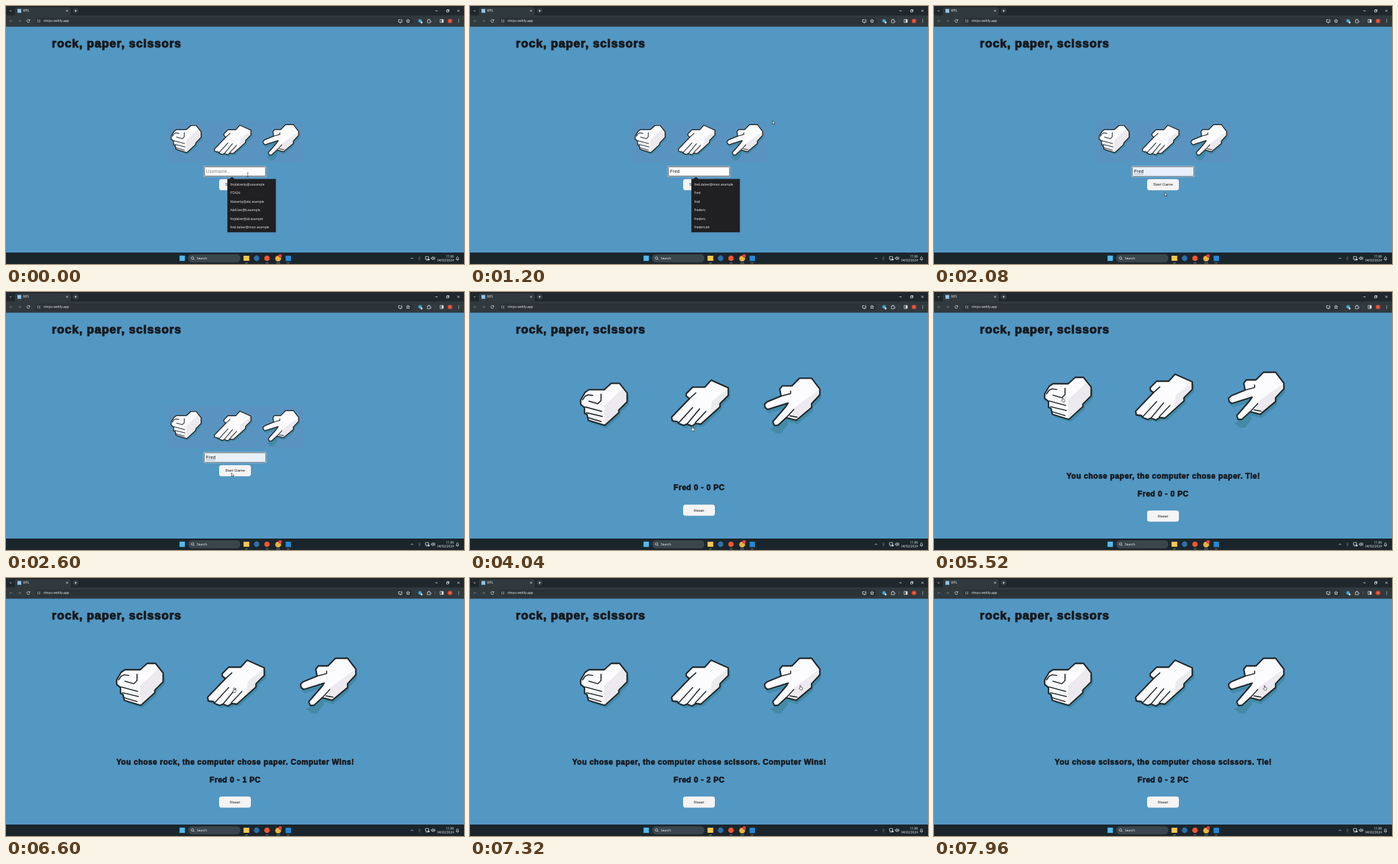
Recreate the animation shown at these times as an HTML page. Size 720x405 px, loop 8000 ms.

```html
<!DOCTYPE html>
<html lang="en">
<head>
<meta charset="utf-8">
<title>RPS</title>
<style>
  html, body { margin: 0; width: 100%; height: 100%; overflow: hidden; background: #5397c3; }
  svg { display: block; width: 720px; height: 405px; }
  text { font-family: "Open Sans", "Noto Sans", sans-serif; font-size: 5.1px; fill: #f6f8f9; }
  .arial { font-family: "Liberation Sans", Arial, sans-serif; fill: #161a1d; }
  .field { font-size: 7.2px; }
  .btn { font-size: 6.1px; text-anchor: middle; }
  .head { font-weight: 700; stroke: #161a1d; stroke-linejoin: round; }
  .title { font-size: 18.5px; letter-spacing: .95px; stroke-width: 1.1px; }
  .note { font-size: 11.9px; letter-spacing: .6px; stroke-width: .7px; text-anchor: middle; }
  .list text { font-size: 4.8px; fill: #f2f2f2; }
  .clock { font-size: 4.9px; text-anchor: end; }
  .line { fill: none; stroke: #eef1f2; stroke-width: .75; }
  .dim { stroke: #72787b; }
  .ink { stroke: #20282c; stroke-width: 2.3; stroke-linejoin: round; stroke-linecap: round; }
  .thin { fill: none; stroke-width: 1.7; }
  .shade { fill: #eceaee; }
  .shadow { fill: #438aa8; }
  .skin { fill: #fcfbfd; }
  .pointer { fill: #fff; stroke: #15181a; stroke-width: .6; stroke-linejoin: round; }
</style>
</head>
<body>
<svg viewBox="0 0 720 405">
  <defs>
    <path id="rockShape" d="M174 160L181 148 187 144H211L222 134H235L247 149V163L234 176V180L212 200 186 192 184 183 180 181V172L174 167Z"/>
    <path id="paperShape" d="M317 187L345 158 340 154V150L350 140H369L379 129 406 141V153L393 166V171L363 198 355 197 349 201 341 198 336 200 328 197 326 194 318 193Z"/>
    <path id="scissorShape" d="M463 167L467 163 489 154 487 143 491 138H506L518 126H537L550 143V152L537 166V172L513 192 497 188 484 200H478L476 194 496 171 500 165 468 175 464 172Z"/>

    <g id="rock">
      <use href="#rockShape" class="shadow" x="3" y="4"/>
      <use href="#rockShape" class="skin"/>
      <path class="shade" d="M241 141L211 169V200L234 180V176L247 163V149Z"/>
      <use href="#rockShape" class="ink" fill="none"/>
      <path class="ink thin" d="M177 160L181 154 186 152 193 153M206 151V161L201 166 187 162M181 171L207 178M183 180L208 186M186 188L206 194"/>
    </g>
    <g id="paper">
      <use href="#paperShape" class="shadow" x="3" y="4"/>
      <use href="#paperShape" class="skin"/>
      <path class="shade" d="M406 142L380 162 378 183 393 171V166L406 153Z"/>
      <use href="#paperShape" class="ink" fill="none"/>
      <path class="ink thin" d="M345 158L355 149M328 196L350 172M341 198L361 174M354 196L371 178"/>
    </g>
    <g id="scissors">
      <use href="#scissorShape" class="shadow" x="2" y="6"/>
      <path class="shadow" d="M472 206L494 191 500 198 489 213H482Z"/>
      <use href="#scissorShape" class="skin"/>
      <path class="shade" d="M550 143L511 171 498 188 513 192 537 172V166L550 152Z"/>
      <use href="#scissorShape" class="ink" fill="none"/>
      <path class="ink thin" d="M489 154L504 150V146M497 188L509 175M503 185L514 187"/>
    </g>
    <g id="hands">
      <use href="#rock"/><use href="#paper"/><use href="#scissors"/>
    </g>
    <g id="reset">
      <rect x="335" y="343" width="50" height="17.5" rx="4" fill="#f5f4f4"/>
      <text class="arial btn" x="360" y="354">Reset</text>
    </g>
  </defs>

  <rect width="720" height="405" fill="#5397c3"/>
  <text class="arial head title" x="72" y="64.8">rock, paper, scissors</text>

  <!-- browser -->
  <rect width="720" height="16" fill="#20282d"/>
  <path d="M14 15V6Q14 2 18 2H98Q102 2 102 6V15Z" fill="#30393e"/>
  <rect y="14.7" width="720" height="17.8" fill="#30393e"/>
  <rect x="46" y="18" width="594" height="11.4" rx="5.7" fill="#2b3338"/>
  <rect x="18" y="4.7" width="6" height="6" fill="#8fc4e4"/>
  <text x="27" y="9.4">RPS</text>
  <circle cx="109.5" cy="7.5" r="4.8" fill="#30393e"/>
  <path class="line" d="M5.8 6.8L7.3 8.3 8.8 6.8M94.6 6.1L97.4 8.9M97.4 6.1L94.6 8.9M109.5 5.7V9.3M107.7 7.5H111.3M675 7.6H678.6M692.6 6.6H695.4V9.4H692.6ZM693.6 6.6V5.6H696.4V8.4H695.4M709.6 5.9L712.8 9.1M712.8 5.9L709.6 9.1"/>
  <path class="line dim" d="M10.5 23.5H5.8M7.8 21.5L5.8 23.5 7.8 25.5M18.8 23.5H23.5M21.5 21.5L23.5 23.5 21.5 25.5"/>
  <path class="line" d="M37 22.4A2.2 2.2 0 1 0 37.2 24.2M37.3 21V22.6H35.6M49 22.3H51M52 22.3H54M49 24.9H50.5M51.5 24.9H54"/>
  <text x="59" y="25.4">nhrps.netlify.app</text>
  <path class="line" d="M620 21.5H617.2V25.2H622.6V23.6M618.8 26.4H621M621.8 20.6V23M620.8 22.2L621.8 23.2 622.8 22.2M632 20.8L632.8 22.6 634.7 22.7 633.2 24 633.7 26 632 24.9 630.3 26 630.8 24 629.3 22.7 631.2 22.6Z"/>
  <circle cx="650.8" cy="23.2" r="2.6" fill="#4aa3cc"/>
  <rect x="652" y="24.4" width="2.6" height="2.8" fill="#dfe6ea"/>
  <path class="line" d="M662.4 22H664V20.9H665.6V22H667V23.6H668V25H667V26.2H662.4Z"/>
  <path d="M674.5 20.5V26.5" stroke="#5b6265" stroke-width=".6"/>
  <path class="line" d="M682.4 21.2H687.4V25.8H682.4Z"/>
  <path d="M685 21.2H687.4V25.8H685Z" fill="#f6f8f9"/>
  <circle cx="698" cy="23.5" r="3.6" fill="#d9452c"/>
  <text x="698" y="25" text-anchor="middle" style="font-size:4px">F</text>
  <path d="M711.7 20.9v1M711.7 23v1M711.7 25.1v1" stroke="#f6f8f9"/>

  <!-- taskbar -->
  <rect y="387" width="720" height="18" fill="#1b252c"/>
  <rect x="272.8" y="391.8" width="8.4" height="8.4" fill="#4cbcf0"/>
  <rect x="286" y="389.7" width="82.5" height="12.8" rx="6.4" fill="#3a454c"/>
  <circle class="line" cx="293.2" cy="395.6" r="1.9"/>
  <path class="line" d="M294.6 397L296.2 398.6"/>
  <text x="300" y="398">Search</text>
  <rect x="373.4" y="392" width="9" height="8" fill="#f6c646"/>
  <circle cx="394" cy="396" r="4.4" fill="#2d6fa6"/>
  <circle cx="410.3" cy="396" r="4.3" fill="#f0552c"/>
  <circle cx="427.8" cy="396.5" r="4.6" fill="#e5b53b"/>
  <circle cx="431" cy="392.2" r="2.7" fill="#e1402f"/>
  <rect x="439.6" y="392" width="8.4" height="8.4" fill="#2489d0"/>
  <path d="M376 403.3h4M408.5 403.3h4M425 403.3h6M441.6 403.3h4" stroke="#8b979d" stroke-width=".8"/>
  <path class="line" d="M636.4 397L638.3 395.1 640.2 397M659.4 393.3H664.4V397.3H659.4ZM660.4 399H663.4M668.6 395H669.8L671.2 393.5V398.5L669.8 397H668.6ZM672.4 394.6Q673.5 396 672.4 397.4M673.6 393.6Q675.2 396 673.6 398.4M707.6 398H711.8L711 396.8V394.8Q709.7 392 708.4 394.8V396.8ZM709 399.2H710.4"/>
  <circle cx="664.6" cy="398" r="1.2" fill="#f6f8f9"/>
  <path class="line dim" d="M650 393V396.5M648.4 395.5Q650 399 651.6 395.5M650 397.5V399.5"/>
  <text class="clock" x="704" y="394.8">11:06</text>
  <text class="clock" x="704" y="400.8">04/02/2024</text>

  <!-- start page -->
  <g data-on="0 2800">
    <rect x="253" y="180" width="214" height="65" fill="#5994c0"/>
    <use href="#rock" transform="translate(147.4 101.2) scale(.645)"/>
    <use href="#paper" transform="translate(123.2 103.9) scale(.645)"/>
    <use href="#scissors" transform="translate(105.4 104.9) scale(.645)"/>
    <rect x="310.6" y="251.2" width="98.8" height="17" rx="2" fill="#f4f8fb"/>
    <rect x="311.7" y="252.3" width="96.6" height="14.8" rx="1" fill="#fff" stroke="#1c2226" stroke-width=".9"/>
    <rect data-on="1640 2800" x="312.2" y="252.8" width="95.6" height="13.8" fill="#e8f0fc"/>
    <text class="arial field" data-on="0 160" x="314.6" y="262.4" style="fill:#7b7f83">Username..</text>
    <text class="arial field" data-on="160 320" x="314.6" y="262.4">F</text>
    <text class="arial field" data-on="320 480" x="314.6" y="262.4">Fr</text>
    <text class="arial field" data-on="480 640" x="314.6" y="262.4">Fre</text>
    <text class="arial field" data-on="640 2800" x="314.6" y="262.4">Fred</text>
    <path data-on="2000 2800" d="M314.8 263.9H329.4" stroke="#6a7078" stroke-width=".5"/>
    <rect x="335" y="271.7" width="50" height="17.6" rx="4" fill="#f5f4f4"/>
    <text class="arial btn" x="360" y="282.4">Start Game</text>
    <g class="list" data-on="0 2000">
      <path d="M348 271.6H351.4L355.2 268.2 359 271.6H424.3V355.3H348Z" fill="#202023"/>
      <rect data-on="1640 2000" x="348" y="286.8" width="76.3" height="13.5" fill="#3b3b3f"/>
      <g id="before" data-on="0 320"></g>
      <g id="after" data-on="320 2000"></g>
    </g>
  </g>

  <!-- game -->
  <g data-on="2800 4800">
    <use href="#hands" y="9.4"/>
    <use href="#reset" y="-9.2"/>
    <text class="arial head note" x="360.3" y="311.4">Fred 0 - 0 PC</text>
  </g>
  <g class="head" data-on="4800 8000">
    <text class="arial note" data-on="4800 5640" x="360.5" y="292.6">You chose paper, the computer chose paper. Tie!</text>
    <text class="arial note" data-on="5640 6720" x="360.5" y="292.6">You chose rock, the computer chose paper. Computer Wins!</text>
    <text class="arial note" data-on="6720 7440" x="360.5" y="292.6">You chose paper, the computer chose scissors. Computer Wins!</text>
    <text class="arial note" data-on="7440 8000" x="360.5" y="292.6">You chose scissors, the computer chose scissors. Tie!</text>
    <text class="arial note" data-on="4800 5640" x="360.3" y="320.6">Fred 0 - 0 PC</text>
    <text class="arial note" data-on="5640 6720" x="360.3" y="320.6">Fred 0 - 1 PC</text>
    <text class="arial note" data-on="6720 8000" x="360.3" y="320.6">Fred 0 - 2 PC</text>
  </g>
  <g data-on="4800 8000">
    <use href="#hands"/>
    <use href="#reset"/>
  </g>

  <g id="cursor">
    <path data-on="0 160" d="M-1.4 -3H1.4M0 -3V3M-1.4 3H1.4" fill="none" stroke="#22282c" stroke-width=".6"/>
    <path class="pointer" data-on="1080 3600" d="M0 0V5.6L1.3 4.4 2.2 6.4 3.1 6 2.2 4.1H3.9Z"/>
    <path class="pointer" data-on="3600 8000" d="M-1.2 -3.4Q-.6 -4.2 0 -3.4V-.8L2.4 -.2Q2.9 .1 2.7 1L2 3.6H-1L-2.7 .9Q-2.5 0 -1.2 .8Z"/>
  </g>
</svg>
<script>
  const LOOP = 8000;
  const byId = id => document.getElementById(id);

  function fillList(id, rows) {
    byId(id).innerHTML = rows
      .map((row, i) => `<text x="352.4" y="${281.7 + i * 13.5}">${row}</text>`)
      .join("");
  }
  fillList("before", ["fmjdalverby@a.example", "f7242d", "fdalverby@abc.example",
    "AddUser@b.example", "fmjdalver@ab.example", "fred.dalver@moor.example"]);
  fillList("after", ["fred.dalver@moor.example", "Fred", "fred",
    "Frederic", "Frederic", "Fredericdd"]);

  // time, x, y
  const path = [
    [0, 380, 265], [160, 380, 265], [1080, 472, 175], [1180, 475.5, 180],
    [1300, 475.5, 180], [1720, 366, 293], [1980, 364, 294], [2440, 354.5, 284],
    [2880, 354.5, 284], [3700, 351, 226], [4000, 350, 214.5], [4200, 350, 214.5],
    [4640, 358, 180], [4960, 358, 180], [5480, 203, 169], [5800, 203, 169],
    [6480, 359, 176], [6860, 359, 176], [7320, 520, 172], [8000, 520.5, 172.5]
  ];

  function cursorAt(t) {
    const i = path.findIndex(p => p[0] > t);
    const [t0, x0, y0] = path[i - 1], [t1, x1, y1] = path[i];
    const u = (t - t0) / (t1 - t0), e = u * u * (3 - 2 * u);
    return [x0 + (x1 - x0) * e, y0 + (y1 - y0) * e];
  }

  const timed = [...document.querySelectorAll("[data-on]")].map(el => {
    const [from, to] = el.dataset.on.split(" ").map(Number);
    return { el, from, to };
  });
  const cursor = byId("cursor");
  const start = performance.now();

  function draw() {
    const t = (performance.now() - start) % LOOP;
    for (const { el, from, to } of timed)
      el.style.display = t >= from && t < to ? "" : "none";
    cursor.setAttribute("transform", `translate(${cursorAt(t).join(" ")})`);
    requestAnimationFrame(draw);
  }
  draw();
</script>
</body>
</html>
```
